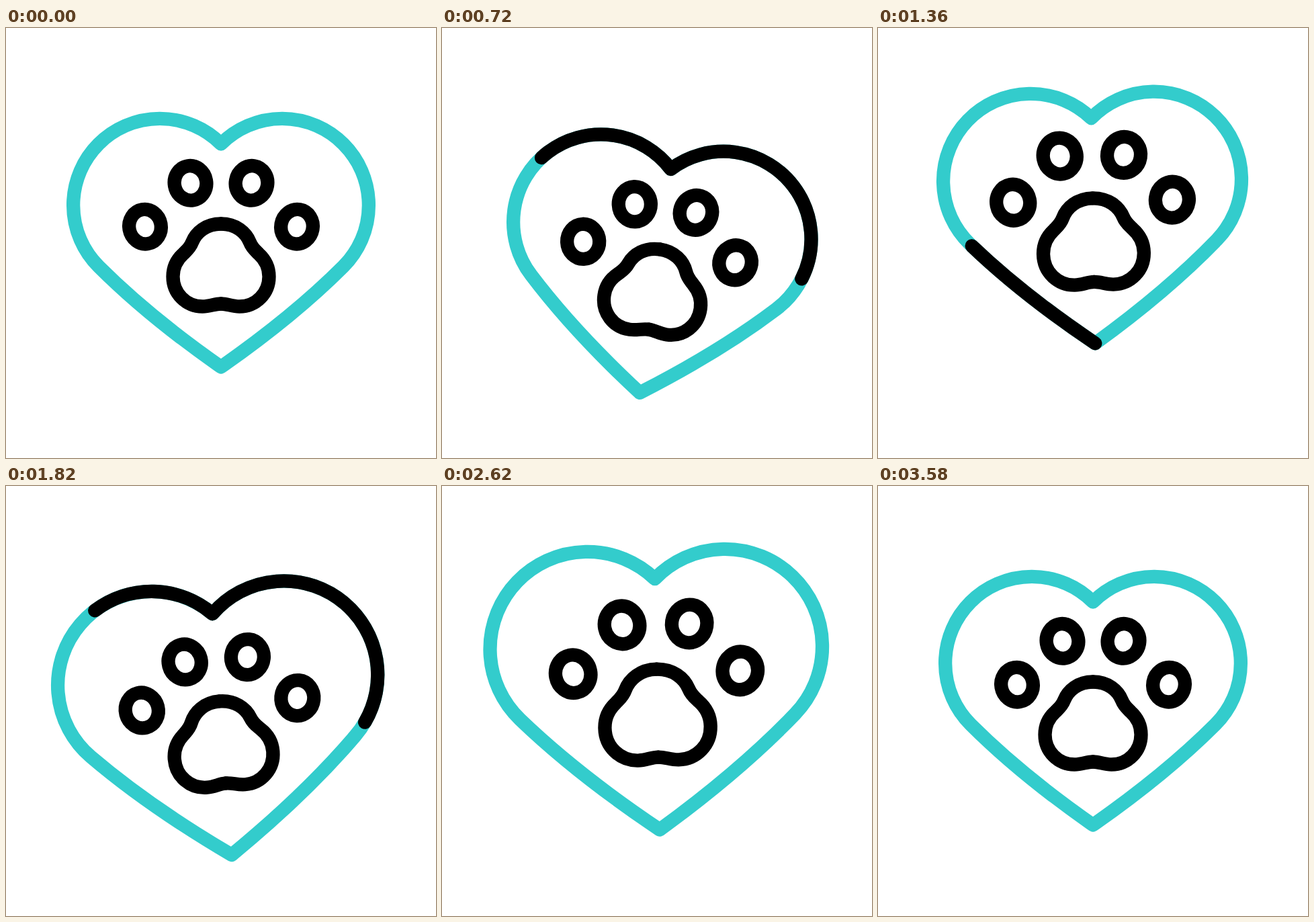
These frames come from a looping animation (640 px wide and 640 px high, 3600 ms). An HTML page:

```html
<!DOCTYPE html>
<html lang="en">
<head>
<meta charset="utf-8">
<title>Paw in a heart</title>
<style>
  html, body { margin: 0; width: 100%; height: 100%; overflow: hidden; background: #fff; }
  svg { display: block; width: 100%; height: 100%; }
</style>
</head>
<body>
<svg viewBox="0 0 640 640" fill="none" stroke="#000" stroke-linecap="round" stroke-linejoin="round">
  <defs>
    <path id="outline" pathLength="1" d="M0 184.5Q-108 109-182 35A128.8 128.8 0 0 1 0-147.5A128.8 128.8 0 0 1 182 35Q108 109 0 184.5"/>
    <g id="half-paw">
      <ellipse rx="23.8" ry="25.8" transform="translate(-113 -24.3) rotate(-10)"/>
      <ellipse rx="23.8" ry="25.8" transform="translate(-45.5 -89.2) rotate(-10)"/>
      <path d="M0-28.5C-22-28.5-37-16-43-1C-46 7-51 11-56 16C-66 25-71.5 37-71.5 50C-71.5 75-52 94.5-27.5 94.5C-16 94.5-10 90.5 0 90.5"/>
    </g>
  </defs>
  <g id="heart">
    <use href="#outline" stroke="#33cccc"/>
    <use href="#outline" class="runner"/>
    <use href="#outline" class="runner"/>
  </g>
  <g id="paw">
    <use href="#half-paw"/>
    <use href="#half-paw" transform="scale(-1 1)"/>
  </g>
</svg>
<script>
const LOOP = 3600, STROKE = 20.3;
const SWEEP = 1046, TAIL_LAG = 317, RUN_EVERY = 1077;
const PAW_LAG = 125;

// heartbeats: start, peak, end
const beats = [[0, 310, 664], [664, 965, 1440], [1560, 1995, 2250], [2300, 2564, 3030]];

// [time, value] keys, eased between neighbours
const bounce = [0, 40, -38, 40, -16, 0].map((y, i) => [i * 657, y]);
const sway = [[0, 0], [960, 9.35], [1640, -7], [2230, 4], [2830, -3.1], [3330, 0]];

const heart = document.getElementById('heart');
const paw = document.getElementById('paw');
const runners = document.querySelectorAll('.runner');

function ease(x) {
  x = Math.min(1, Math.max(0, x));
  return x * x * (3 - 2 * x);
}

function at(keys, t) {
  let value = 0;
  for (let i = 1; i < keys.length; i++) {
    const [t0, a] = keys[i - 1], [t1, b] = keys[i];
    value += (b - a) * ease((t - t0) / (t1 - t0));
  }
  return value;
}

function pulse(t) {
  return beats.reduce((sum, [start, peak, end]) =>
    sum + ease((t - start) / (peak - start)) - ease((t - peak) / (end - peak)), 0);
}

function place(group, t, size) {
  group.setAttribute('transform',
    `translate(320 ${320 + at(bounce, t)}) rotate(${at(sway, t)}) scale(${size})`);
  group.setAttribute('stroke-width', STROKE / size);
}

function draw() {
  const t = performance.now() % LOOP;
  place(heart, t, 1 + 0.13 * pulse(t));
  place(paw, t, 1 + 0.12 * pulse(t - PAW_LAG));
  runners.forEach((runner, i) => {
    const age = t - i * RUN_EVERY;
    const tail = ease((age - TAIL_LAG) / SWEEP);
    const length = ease(age / SWEEP) - tail;
    runner.style.display = length > 0.0005 ? '' : 'none';
    runner.setAttribute('stroke-dasharray', `${length} 2`);
    runner.setAttribute('stroke-dashoffset', -tail);
  });
  requestAnimationFrame(draw);
}
draw();
</script>
</body>
</html>
```
